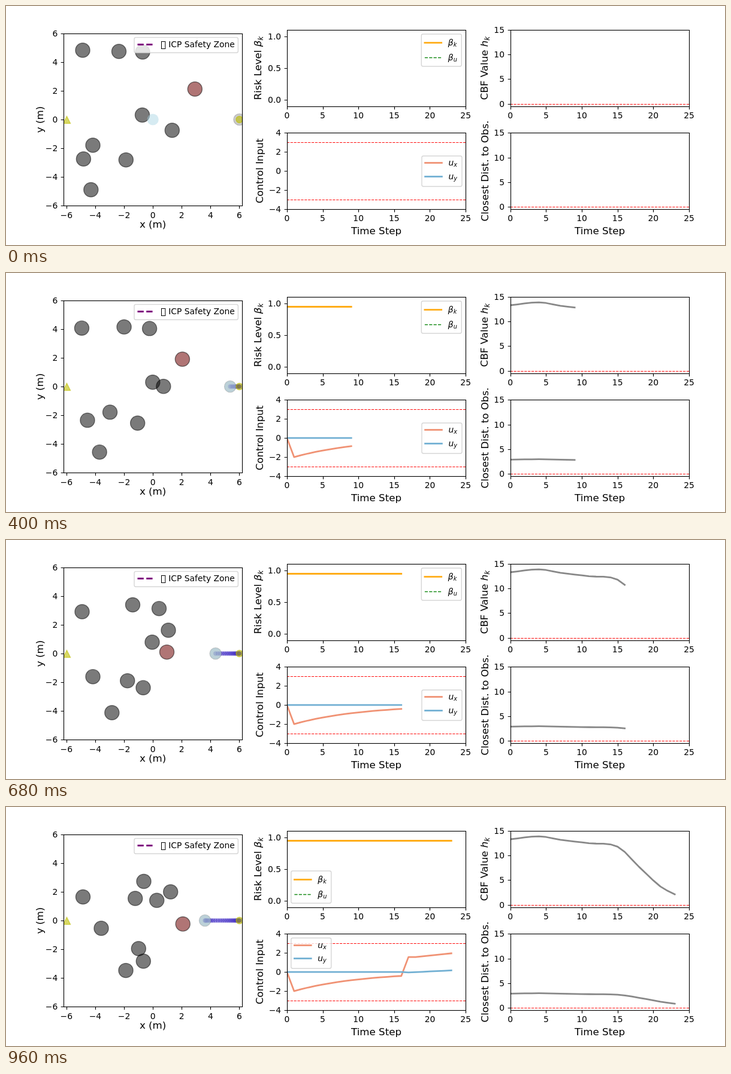
Recreate the animation shown at these times as an HTML page with a canvas. Size 1200 px wide and 400 px high, loop 1 s.

```html
<!DOCTYPE html>
<html lang="en">
<head>
<meta charset="utf-8">
<title>Safe navigation plots</title>
<style>
  html, body { margin: 0; width: 100%; height: 100%; overflow: hidden; background: #fff; }
  canvas { display: block; }
</style>
</head>
<body>
<canvas id="stage" width="1200" height="400"></canvas>
<script>
const ctx = document.getElementById('stage').getContext('2d');
const FRAME_MS = 40, FRAMES = 25, LEGEND_MOVE = 20;
const SMALL = 13.89, LARGE = 16.67;
const HAIR = 1.11, THIN = 1.39, BOLD = 2.78;
const TAU = Math.PI * 2;

const snap = v => Math.floor(v + 0.5) + 0.5;
const range = (from, to, step) =>
  Array.from({ length: Math.round((to - from) / step) + 1 }, (_, i) => from + i * step);

function panel(x, y, w, h, [x0, x1], [y0, y1], xTicks, yTicks, digits = 0) {
  return {
    x, y, w, h, xTicks, yTicks, digits,
    px: v => x + (v - x0) / (x1 - x0) * w,
    py: v => y + h - (v - y0) / (y1 - y0) * h
  };
}

const W = 298.29, H = 127.66, MID = 468.86, RIGHT = 841.71, TOP = 40, LOW = 212.34;
const steps = range(0, 25, 5), evens = range(-6, 6, 2);
const arena = panel(96, 45.67, W, 288.67, [-6.2, 6.2], [-6, 6], evens, evens);
const risk = panel(MID, TOP, W, H, [0, 25], [-0.1, 1.1], steps, [0, 0.5, 1], 1);
const control = panel(MID, LOW, W, H, [0, 25], [-4, 4], steps, range(-4, 4, 2));
const barrier = panel(RIGHT, TOP, W, H, [0, 25], [-0.5, 15], steps, range(0, 15, 5));
const closest = panel(RIGHT, LOW, W, H, [0, 25], [-0.5, 15], steps, range(0, 15, 5));
const panels = [arena, risk, control, barrier, closest];

// Smooth curve (cubic Hermite) through values at increasing times
function curve(times, values) {
  const last = times.length - 1;
  const slope = j => {
    const a = Math.max(j - 1, 0), b = Math.min(j + 1, last);
    return (values[b] - values[a]) / (times[b] - times[a]);
  };
  return t => {
    let i = 0;
    while (i < last - 1 && times[i + 1] <= t) i++;
    const d = times[i + 1] - times[i], s = (t - times[i]) / d;
    return values[i] * (1 + 2 * s) * (1 - s) ** 2 + values[i + 1] * s * s * (3 - 2 * s)
      + d * s * (1 - s) * (slope(i) * (1 - s) - slope(i + 1) * s);
  };
}

// Plotted series as functions of the time step
const BRAKE = 17;
const beta = () => 0.95;
const ux = i => i === 0 ? 0 : i < BRAKE ? -2 * 0.9 ** (i - 1) : 1.57 + 0.078 * Math.max(0, i - BRAKE - 1);
const uy = i => i < BRAKE ? 0 : -0.05 + 0.037 * (i - BRAKE);
const cbf = curve([0, 4, 7, 11, 15, 18, 21, 23], [13.3, 13.9, 13.2, 12.5, 11.8, 7.7, 3.7, 2.1]);
const gap = i => Math.sqrt(cbf(i) + 0.81) - 0.9;

// Robot: double integrator driven by ux
const robotX = [6];
for (let i = 0, v = 0, dt = 0.1; i < FRAMES - 1; i++) {
  robotX.push(robotX[i] + v * dt + ux(i) * dt * dt / 2);
  v += ux(i) * dt;
}

// Obstacles drift smoothly through four waypoints
const WAY_TIMES = [0, 8, 17, 24];
const obstacles = [
  [[128, 74], [126.5, 86], [127, 120], [128.5, 150.5]],
  [[188.5, 76], [194, 86], [211.5, 108.5], [230, 124.5]],
  [[228, 77], [236, 88], [255.5, 114.7], [274.7, 142]],
  [[227.5, 182.5], [239.5, 182], [268.5, 187.6], [295.2, 195.8]],
  [[277.3, 208], [267, 194.5], [244, 171], [215.7, 153]],
  [[315.3, 139], [300.2, 142.7], [271, 151], [251.7, 156.3]],
  [[145, 233], [166, 232.4], [202.7, 235.6], [221.3, 237]],
  [[129.4, 256], [134, 250], [145, 228.7], [159, 203]],
  [[200.3, 257.6], [216.3, 252.8], [229, 247.2], [229.3, 258]],
  [[141.8, 307.5], [151.5, 302], [176.8, 289], [200, 273.6]]
].map(way => [0, 1].map(axis => curve(WAY_TIMES, way.map(p => p[axis]))));

function text(str, x, y, align = 'left', size = SMALL, style = '') {
  ctx.font = `${style} ${size}px "DejaVu Sans", sans-serif`;
  ctx.textAlign = align;
  ctx.fillStyle = '#000';
  ctx.fillText(str, x, y);
  return ctx.measureText(str).width;
}

function symbol(main, sub, x, y, size = SMALL) {
  const w = text(main, x, y, 'left', size, 'italic');
  text(sub, x + w, y + size * 0.16, 'left', size * 0.7, 'italic');
}

function sideLabel(str, x, y, main, sub) {
  ctx.save();
  ctx.translate(x, y);
  ctx.rotate(-Math.PI / 2);
  if (main) {
    const symbolWidth = LARGE * 1.05;
    const w = text(str, -symbolWidth / 2, 0, 'center', LARGE);
    symbol(main, sub, (w - symbolWidth) / 2, 0, LARGE);
  } else {
    text(str, 0, 0, 'center', LARGE);
  }
  ctx.restore();
}

function stroke(points, color, width, dashed = false) {
  ctx.save();
  ctx.strokeStyle = color;
  ctx.lineWidth = width;
  ctx.lineJoin = 'round';
  ctx.lineCap = dashed ? 'butt' : 'square';
  if (dashed) ctx.setLineDash([3.7 * width, 1.6 * width]);
  ctx.beginPath();
  points.forEach(([x, y]) => ctx.lineTo(x, y));
  ctx.stroke();
  ctx.restore();
}

function paint(fill, edge) {
  ctx.fillStyle = fill;
  ctx.fill();
  if (!edge) return;
  ctx.strokeStyle = edge;
  ctx.lineWidth = THIN;
  ctx.stroke();
}

function disc(x, y, r, fill, edge) {
  ctx.beginPath();
  ctx.arc(x, y, r, 0, TAU);
  paint(fill, edge);
}

function clipped(p, draw) {
  ctx.save();
  ctx.beginPath();
  ctx.rect(p.x, p.y, p.w, p.h);
  ctx.clip();
  draw();
  ctx.restore();
}

function drawAxes(p) {
  const left = snap(p.x), right = snap(p.x + p.w), top = snap(p.y), bottom = snap(p.y + p.h);
  const label = (v, digits) => v.toFixed(digits).replace('-', '\u2212');
  ctx.strokeStyle = '#000';
  ctx.lineWidth = HAIR;
  ctx.strokeRect(left, top, right - left, bottom - top);
  ctx.beginPath();
  for (const v of p.xTicks) {
    const x = snap(p.px(v));
    ctx.moveTo(x, bottom);
    ctx.lineTo(x, bottom + 4.86);
    text(label(v, 0), p.px(v), Math.round(p.y + p.h + 20.2), 'center');
  }
  for (const v of p.yTicks) {
    const y = snap(p.py(v));
    ctx.moveTo(left, y);
    ctx.lineTo(left - 4.86, y);
    text(label(v, p.digits), p.x - 9.72, Math.round(p.py(v) + 5), 'right');
  }
  ctx.stroke();
}

function drawLabels() {
  text('x (m)', 245.1, 371, 'center', LARGE);
  text('Time Step', 618, 382, 'center', LARGE);
  text('Time Step', 991, 382, 'center', LARGE);
  sideLabel('y (m)', 62, 190);
  sideLabel('Risk Level ', 426, 104, 'β', 'k');
  sideLabel('Control Input', 429, 276);
  sideLabel('CBF Value ', 804, 104, 'h', 'k');
  sideLabel('Closest Dist. to Obs.', 805, 276);
}

function series(p, value, count, color) {
  const points = range(0, count - 1, 1).map(i => [p.px(i), p.py(value(i))]);
  clipped(p, () => stroke(points, color, BOLD));
}

function level(p, v, x1, x2, color, width, dashed) {
  const y = snap(p.py(v));
  clipped(p, () => stroke([[x1, y], [x2, y]], color, width, dashed));
}

const limit = (p, v) => level(p, v, p.x, p.x + p.w, '#f00', HAIR, true);

function legendBox(x, y, w, h) {
  ctx.beginPath();
  ctx.roundRect(x, y, w, h, 2.78);
  paint('rgba(255,255,255,.8)', 'rgba(204,204,204,.8)');
}

function legend(x, y, h, rows) {
  legendBox(x, y, 67, h);
  for (const [dy, main, sub, color, width, dashed] of rows) {
    const lineY = Math.floor(y + dy) + 0.5;
    stroke([[x + 5.6, lineY], [x + 33.4, lineY]], color, width, dashed);
    symbol(main, sub, x + 44.5, lineY + 4.5);
  }
}

const ORANGE = 'rgba(255,165,0,.9)', GREEN = 'rgba(0,128,0,.9)';
const SALMON = '#f09274', BLUE = '#72b0d3', GRAY = '#888';

function drawLegends(k) {
  legendBox(214, 52.6, 173.4, 25.7);
  stroke([[219.5, 64.5], [247.3, 64.5]], '#800080', BOLD, true);
  ctx.strokeStyle = '#000';
  ctx.lineWidth = 1;
  ctx.strokeRect(259.5, 59.5, 6.3, 12);
  text('ICP Safety Zone', 271.2, 69);

  const moved = k >= LEGEND_MOVE;
  legend(moved ? 475.8 : 693.3, moved ? 107 : 47, 54,
    [[14.5, 'β', 'k', ORANGE, BOLD], [39.2, 'β', 'u', GREEN, THIN, true]]);
  legend(moved ? 475.8 : 694, moved ? 219.3 : 251, 51,
    [[11.9, 'u', 'x', SALMON, BOLD], [34.5, 'u', 'y', BLUE, BOLD]]);
}

function drawArena(k) {
  const rx = arena.px(robotX[k]), cy = arena.py(0);
  const spots = obstacles.map(([x, y]) => ({ x: x(k), y: y(k) }));
  const dist = s => Math.hypot(s.x - rx, s.y - cy);
  const nearest = spots.reduce((a, b) => dist(b) < dist(a) ? b : a);

  for (const s of spots) {
    disc(s.x, s.y, 12.03, s === nearest ? 'rgba(110,0,0,.54)' : 'rgba(0,0,0,.52)', 'rgba(0,0,0,.5)');
  }
  if (k) robotX.slice(0, k + 1).forEach(x => disc(arena.px(x), cy, 3.7, 'rgba(35,10,185,.42)'));
  disc(rx, cy, 9.6, 'rgba(128,128,128,.4)', 'rgba(128,128,128,.4)');
  disc(k ? rx : arena.px(0), cy, 9.6, 'rgba(173,216,230,.5)');

  const yellow = 'rgba(191,191,0,.6)';
  disc(arena.px(6), cy, 5.5, yellow, yellow);
  const sx = snap(arena.px(-6)), sy = snap(cy);
  ctx.beginPath();
  ctx.moveTo(sx, sy - 6);
  ctx.lineTo(sx - 6, sy + 6);
  ctx.lineTo(sx + 6, sy + 6);
  ctx.closePath();
  paint(yellow, yellow);
}

function draw(k) {
  ctx.fillStyle = '#fff';
  ctx.fillRect(0, 0, 1200, 400);
  clipped(arena, () => drawArena(k));
  if (k) {
    level(risk, beta(), risk.x, risk.px(k - 1), ORANGE, BOLD);
    series(control, ux, k, SALMON);
    series(control, uy, k, BLUE);
    series(barrier, cbf, k, GRAY);
    series(closest, gap, k, GRAY);
  }
  limit(control, 3);
  limit(control, -3);
  limit(barrier, 0);
  limit(closest, 0);
  panels.forEach(drawAxes);
  drawLabels();
  drawLegends(k);
}

function tick() {
  draw(Math.floor(performance.now() / FRAME_MS) % FRAMES);
  requestAnimationFrame(tick);
}
tick();
</script>
</body>
</html>
```
